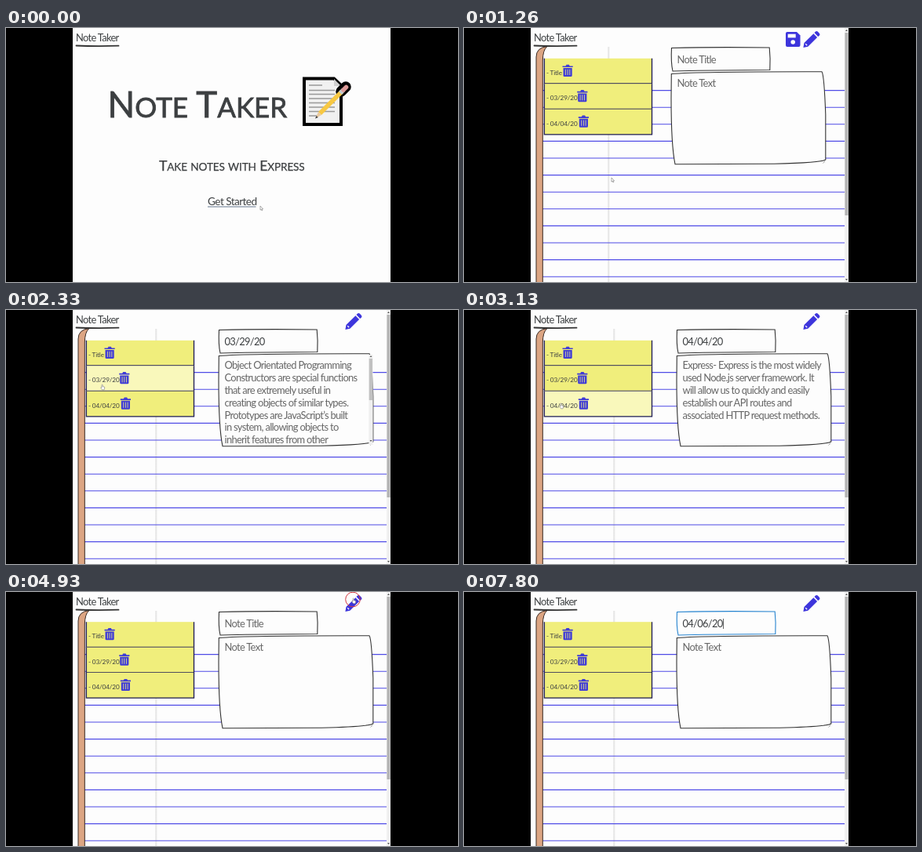
An HTML page for the animation above (8 s loop, 576 px wide and 324 px high).

```html
<!DOCTYPE html>
<html lang="en">
<head>
<meta charset="utf-8">
<title>Note Taker</title>
<style>
  html, body { margin: 0; width: 100%; height: 100%; overflow: hidden; background: #000; }
  svg { display: block; }
  text { font: 12.9px Lato, sans-serif; letter-spacing: -.68px; fill: #3c3f41; white-space: pre; }
  tspan { font-size: .77em; }
  .title { font-size: 45.5px; letter-spacing: 0; stroke: #3c3f41; stroke-width: .8; }
  .subtitle { font-size: 17.7px; letter-spacing: -.15px; stroke: #3c3f41; stroke-width: .25; }
  .link { font-size: 13.6px; letter-spacing: -.55px; }
  .item { font-size: 8.2px; letter-spacing: -.15px; }
  .grey { fill: #666; }
  .blue { fill: #3d35dc; }
  .box { fill: #fdfdfd; stroke: #333; stroke-width: 1.1; }
</style>
</head>
<body>
<svg width="576" height="324" viewBox="0 0 576 324">
  <defs>
    <linearGradient id="fold">
      <stop stop-color="#d9d9d9"/><stop offset="1" stop-color="#fdfdfd"/>
    </linearGradient>
    <g id="trash">
      <path d="M0 2H4L5 .3H8.3L9.3 2H13.2V3.7H0ZM1 4.6H12.2V14Q12.2 15.5 10.7 15.5H2.5Q1 15.5 1 14Z" fill="#403cd6"/>
      <path d="M3.9 6.4V13.6M6.6 6.4V13.6M9.3 6.4V13.6" stroke="#c9c89c"/>
    </g>
  </defs>
  <path fill="#fdfdfd" d="M85 0H490V324H85Z"/>

  <g id="landing">
    <text class="title" x="129.5" y="114">N<tspan>OTE</tspan> T<tspan>AKER</tspan></text>
    <text class="subtitle" x="195" y="182">T<tspan>AKE</tspan> <tspan>NOTES</tspan> <tspan>WITH</tspan> E<tspan>XPRESS</tspan></text>
    <text class="link" x="257" y="225.5">Get Started</text>
    <path d="M257 228H318.5" stroke="#63758c"/>
    <path d="M380 64.5H418L427 73V123H380Z" fill="#f1f1f1" stroke="#000" stroke-width="4"/>
    <path d="M418 65V74H427Z" fill="#d0d0d0"/>
    <path d="M386 73H403M386 79.5H419M386 84.5H419M386 90H419M386 95.5H419M386 101H419M386 106.5H419M386 112H397" stroke="#999" stroke-width="1.3"/>
    <path d="M427 81L433 75" stroke="#000" stroke-width="13.5" stroke-linecap="round"/>
    <path d="M400 109L428 81" stroke="#f7c843" stroke-width="5.6"/>
    <path d="M426 83L430 79" stroke="#c3ccd0" stroke-width="5.6"/>
    <path d="M430 79L433.5 75.5" stroke="#dc9a98" stroke-width="5.6" stroke-linecap="round"/>
    <path d="M398 107L402 111L394.5 115Z" fill="#e9c9a0"/>
    <path d="M394 115.5L395.5 112.3L397.8 114Z" fill="#333"/>
  </g>

  <g id="notebook">
    <rect id="divider" y="24" width="2.5" height="300" fill="url(#fold)"/>
    <path id="rules" stroke="#4f4be6" stroke-width="1.1"/>
    <path d="M92 325V37Q92 25 106 23.5Q100.3 28 100.3 42V325Z" fill="#dca583" stroke="#382a25"/>
    <g id="list"></g>
    <g id="editor">
      <path id="titleBox" class="box" d="M264.5 25.5Q320 24 389.2 25Q390.6 38 389.8 53.5Q330 53.5 266 55Q263.5 44 264.5 25.5Z"/>
      <path class="box" d="M264.3 58.5Q300 55.5 456 55.7Q459 60 460.8 110V168Q455 171.8 395 173.3L269 173.7Q264 150 264 90Z"/>
      <path d="M457.5 172.5L460 170" stroke="#777" stroke-width=".7"/>
      <text id="noteTitle" x="271.5" y="44.7"></text>
      <path id="caret" d="M0 34V47" stroke="#333" stroke-width=".8"/>
      <g id="noteText"></g>
      <g id="innerBar">
        <path d="M455.3 57H460.5V172H455.3Z" fill="#f0f0f0"/>
        <path d="M455.7 62H460V115H455.7Z" fill="#c1c1c1"/>
        <path d="M456.5 60L458 58.2L459.5 60ZM456.5 166L458 168L459.5 166Z" fill="#555"/>
      </g>
    </g>
    <g id="save">
      <path class="blue" d="M412 5H424L428.5 9.5V22Q428.5 24 426.5 24H412Q410 24 410 22V7Q410 5 412 5Z"/>
      <path d="M412.7 7.7H422.7V12.4H412.7Z" fill="#fdfdfd"/>
      <circle cx="419.2" cy="18" r="2.8" fill="#fdfdfd"/>
    </g>
    <path class="blue" d="M432.4 25L433.5 19L445.4 7.2L450.1 11.9L438.3 23.8ZM446.5 6.1L448 4.6Q449.3 3.5 450.7 4.6L453 7Q454 8.3 453 9.4L451.2 10.9Z"/>
    <path d="M435.2 20.3L437.2 22.2" stroke="#fdfdfd" stroke-width="1.2"/>
    <path d="M485 0H490V324H485Z" fill="#f1f1f1"/>
    <path d="M485.4 6H489.7V239H485.4Z" fill="#b5b5b5"/>
    <path d="M486 4L487.5 2L489 4ZM486 320L487.5 322L489 320Z" fill="#555"/>
  </g>

  <text x="89" y="16.7">Note Taker</text>
  <path d="M89.5 22.5Q115 23.6 143.5 22.7" fill="none" stroke="#333" stroke-width="1.8" stroke-linecap="round"/>
  <circle id="ring" cx="442" cy="9.5" r="9.3" fill="none" stroke="#d2383f"/>
  <g id="cursor" fill="#fff" stroke="#777" stroke-width=".6">
    <path id="arrow" d="M0 0V5.2L1.2 4.2L2 6L2.8 5.6L2 3.9H3.6Z"/>
    <path id="hand" d="M0 4V.5Q.6 -.3 1.2 .5V2.6L3.6 3.2V5L3 6.8H.6L-1.2 4.2L-.8 3.5Z"/>
  </g>
</svg>
<script>
const $ = id => document.getElementById(id);
const show = (id, on) => $(id).style.display = on ? '' : 'none';
const LOOP = 8000, OPEN = 530, FIRST = 2130, SECOND = 2900, CLEAR = 4800, FOCUS = 5860;
const keyTimes = [6000, 6260, 6530, 6930, 7060, 7330, 7730, 7800];
const typed = '04/06/20';
const path = [
  [0, 324, 227], [60, 324, 227], [260, 302, 221], [600, 302, 221], [1260, 188, 191],
  [2050, 122, 95], [2450, 122, 95], [2850, 123, 119], [3400, 123, 119], [3860, 268, 198],
  [4500, 442, 8], [5050, 442, 8], [5660, 310, 40], [LOOP, 310, 40]
];
const notes = [
  ['03/29/20', ['Object Orientated Programming', 'Constructors are special functions',
    'that are extremely useful in', 'creating objects of similar types.', 'Prototypes are JavaScript’s built',
    'in system, allowing objects to', 'inherit features from other']],
  ['04/04/20', ['Express- Express is the most widely', 'used Node.js server framework. It',
    'will allow us to quickly and easily', 'establish our API routes and', 'associated HTTP request methods.']]
];

$('rules').setAttribute('d', Array.from({ length: 12 }, (_, i) => `M100 ${79.6 + i * 21.6}H485`).join(''));
$('list').innerHTML = [['Title', 125.5], ['03/29/20', 144.2], ['04/04/20', 145.8]].map(([name, x], i) => {
  const y = 38.8 + i * 32.4;
  return `<rect x="102" y="${y}" width="138" height="32.4" fill="#f0ee7c"/>
    <path d="M102.4 ${y}V${y + 32.2}H239.5V${y}" fill="none" stroke="#1d1a55" stroke-width="1.3"/>
    <text class="item" x="105" y="${y + 21}">- ${name}</text>
    <use href="#trash" x="${x}" y="${y + 7.6}"/>`;
}).join('');
const items = $('list').querySelectorAll('rect');

let shown;
function fillNote(title, lines) {
  const key = title + lines[0];
  if (key === shown) return;
  shown = key;
  const empty = title === 'Note Title';
  $('noteTitle').textContent = title;
  $('noteTitle').setAttribute('class', empty ? 'grey' : '');
  $('noteText').innerHTML = lines.map((line, i) =>
    `<text class="grey" x="271.5" y="${75.3 + i * 15.8}">${line}</text>`).join('');
  const caretX = empty ? 271 : 272.5 + $('noteTitle').getComputedTextLength();
  $('caret').setAttribute('transform', `translate(${caretX})`);
}

function cursorAt(t) {
  const i = path.findIndex(p => p[0] > t);
  const [t0, x0, y0] = path[i - 1], [t1, x1, y1] = path[i];
  const u = (t - t0) / (t1 - t0), e = u * u * (3 - 2 * u);
  return [x0 + (x1 - x0) * e, y0 + (y1 - y0) * e];
}

function draw(t) {
  const inNotebook = t >= OPEN;
  show('landing', !inNotebook);
  show('notebook', inNotebook);
  show('save', t < FIRST);
  show('innerBar', t >= FIRST && t < SECOND);
  show('ring', t >= CLEAR && t < 5000);
  show('cursor', t < keyTimes[0]);
  show('caret', t >= FOCUS);

  const [x, y] = cursorAt(t);
  const row = inNotebook && x > 102 && x < 240 ? Math.floor((y - 38.8) / 32.4) : -1;
  const overItem = row >= 0 && row < items.length;
  const overPencil = x > 432 && y < 25;
  items.forEach((item, i) => item.setAttribute('fill', i === row ? '#f9f8bb' : '#f0ee7c'));
  $('cursor').setAttribute('transform', `translate(${x} ${y})`);
  show('hand', overItem || overPencil);
  show('arrow', !overItem && !overPencil);

  const shift = t < FIRST ? 0 : 7;
  $('editor').setAttribute('transform', `translate(${shift})`);
  $('divider').setAttribute('x', 183.5 + shift);
  $('list').setAttribute('transform', `translate(0 ${t < 4400 ? 0 : -.6})`);
  $('titleBox').style.stroke = t < FOCUS ? '' : '#2583cf';

  if (t >= FIRST && t < CLEAR) fillNote(...notes[t < SECOND ? 0 : 1]);
  else fillNote(typed.slice(0, keyTimes.filter(k => k <= t).length) || 'Note Title', ['Note Text']);
}

function tick() {
  draw(performance.now() % LOOP);
  requestAnimationFrame(tick);
}
tick();
</script>
</body>
</html>
```
